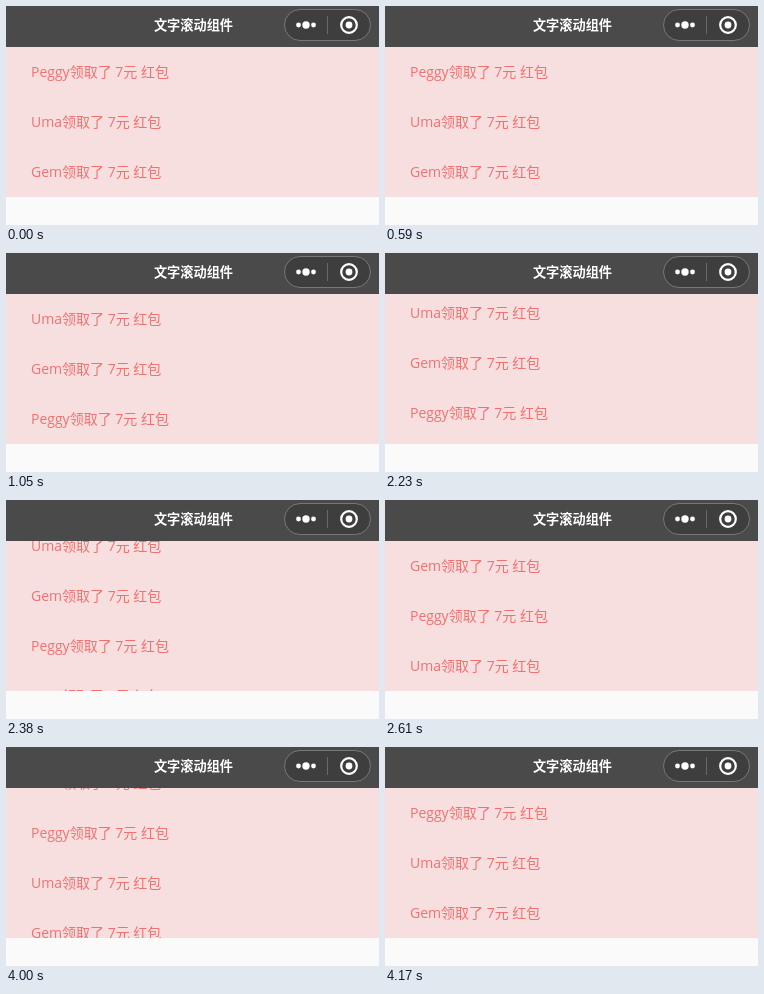
An HTML page that plays this animation: 373x219 px, repeating every 4400 ms.

```html
<!DOCTYPE html>
<html lang="zh-CN">
<head>
<meta charset="utf-8">
<title>文字滚动组件</title>
<style>
  html, body { margin: 0; width: 100%; height: 100%; overflow: hidden; background: #fafafa; }
  body { position: relative; font-family: "Open Sans", "Noto Sans CJK SC", "Noto Sans CJK", sans-serif; }
  header { position: absolute; inset: 0 0 auto; height: 41px; background: #4a4a4a; }
  h1 { position: absolute; left: 0; width: 375px; margin: 0; text-align: center;
       font-size: 13.2px; line-height: 38px; color: #fff; }
  svg { position: absolute; left: 0; top: 0; }
  #view { position: absolute; top: 41px; left: 0; right: 0; height: 150px; overflow: hidden; background: #f8dfdf; }
  #list div { height: 50px; padding-left: 25px; font-size: 14px; line-height: 50px; white-space: pre; color: #f17070; }
</style>
</head>
<body>
<header>
  <h1>文字滚动组件</h1>
  <svg width="373" height="41" fill="#fff">
    <rect x="278.5" y="3.5" width="86" height="31" rx="15.5" fill="#3e3e3e" stroke="#777"/>
    <path d="M321.5 10v18" stroke="#686868"/>
    <circle cx="292.5" cy="19" r="2.4"/>
    <circle cx="300" cy="19" r="3.7"/>
    <circle cx="307.5" cy="19" r="2.4"/>
    <circle cx="343" cy="19" r="7.8" fill="none" stroke="#fff" stroke-width="2.2"/>
    <circle cx="343" cy="19" r="3.4"/>
  </svg>
</header>
<div id="view"><div id="list"></div></div>
<script>
const LOOP = 4400, ROW = 50, SLIDE = 500;
// start: beginning of the eased slide; the picture updates in even steps from first to last
const slides = [
  { start: 548, first: 590, last: 1050, steps: 7 },
  { start: 2075, first: 2230, last: 2610, steps: 6 },
  { start: 3662, first: 3770, last: 4170, steps: 6 }
];
const names = ["Peggy", "Uma", "Gem"];
const list = document.getElementById("list");
for (const name of [...names, ...names]) {
  const row = document.createElement("div");
  row.textContent = `${name}领取了 7元 红包`;
  list.append(row);
}

const easeInOutCubic = x => x < 0.5 ? 4 * x ** 3 : 1 - 4 * (1 - x) ** 3;

function progress(t, { start, first, last, steps }) {
  if (t < first) return 0;
  if (t >= last) return 1;
  const step = (last - first) / (steps - 1);
  const shown = first + Math.floor((t - first) / step + 1e-6) * step;
  return easeInOutCubic(Math.min(1, (shown - start) / SLIDE));
}

function draw(now) {
  const t = now % LOOP;
  const shift = slides.reduce((sum, slide) => sum + progress(t, slide), 0) * ROW;
  list.style.transform = `translateY(${-Math.round(shift)}px)`;
}

const origin = performance.now();
function tick() {
  draw(performance.now() - origin);
  requestAnimationFrame(tick);
}
tick();
</script>
</body>
</html>
```
